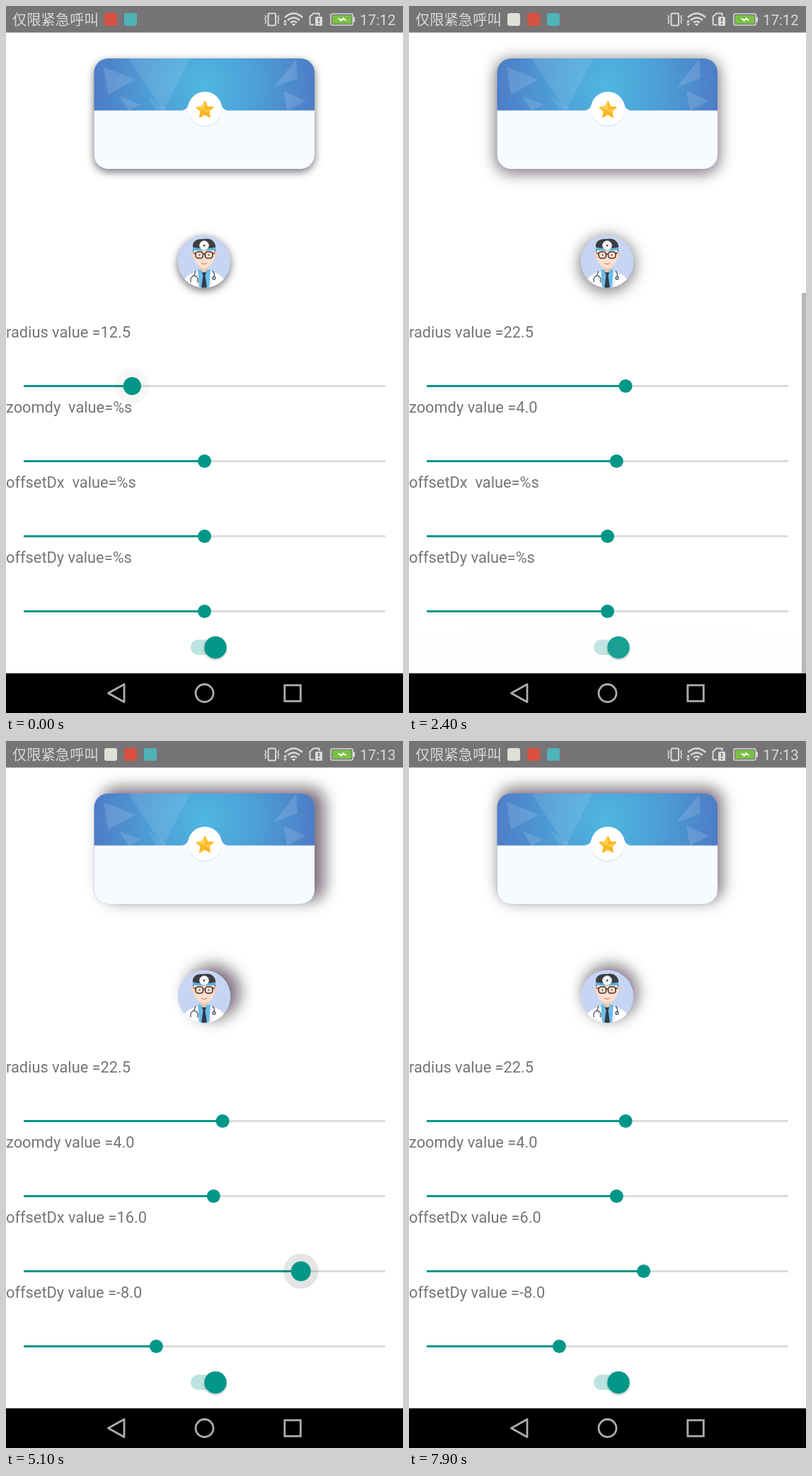
Recreate the animation shown at these times as an HTML page. Size 561 by 998 pixels, loop 8000 ms.

```html
<!DOCTYPE html>
<html lang="zh">
<head>
<meta charset="utf-8">
<title>Shadow settings</title>
<style>
  html, body { margin: 0; width: 100%; height: 100%; overflow: hidden; background: #fff; }
  svg { display: block; width: 561px; height: 998px; }
  text { font-family: Roboto, sans-serif; white-space: pre; }
  .label { font-size: 21.8px; fill: #757575; }
  .status { font-size: 20.4px; fill: #dad8da; }
  .cjk { font-family: "Noto Sans CJK SC", "Noto Sans CJK", sans-serif; font-size: 20.3px; }
</style>
</head>
<body>
<svg viewBox="0 0 561 998">
  <defs>
    <filter id="soft" filterUnits="userSpaceOnUse" x="0" y="0" width="561" height="500">
      <feGaussianBlur id="blur" stdDeviation="6"/>
    </filter>
    <filter id="drop" x="-30%" y="-30%" width="160%" height="160%">
      <feDropShadow dx="0" dy="1.5" stdDeviation="1.5" flood-opacity=".3"/>
    </filter>
    <radialGradient id="sky" gradientUnits="userSpaceOnUse" cx="280" cy="112" r="158">
      <stop offset="0" stop-color="#4fb7e1"/>
      <stop offset=".45" stop-color="#4da0d8"/>
      <stop offset="1" stop-color="#4d7dc6"/>
    </radialGradient>
    <linearGradient id="gold" x2="1" y2="1">
      <stop offset="0" stop-color="#ffd23c"/>
      <stop offset="1" stop-color="#f9a210"/>
    </linearGradient>
    <clipPath id="cardClip"><rect x="124.5" y="74" width="311.5" height="156" rx="20"/></clipPath>
    <clipPath id="faceClip"><circle cx="280" cy="360.5" r="37.3"/></clipPath>
  </defs>
  <rect width="561" height="998" fill="#fff"/>

  <g id="page">
    <g filter="url(#soft)" fill="#140a10" fill-opacity=".57">
      <rect id="cardShade"/>
      <circle id="faceShade"/>
    </g>

    <g clip-path="url(#cardClip)">
      <rect x="124" y="73" width="313" height="158" fill="url(#sky)"/>
      <g fill="#fff" fill-opacity=".13">
        <path d="M138 86l45 18-39 21zM160 127l30 12-17 9zM410 75l2 27-34 13zM392 120l32 14-27 14z"/>
        <path d="M173 74h87l-38 74z" fill-opacity=".1"/>
        <path d="M200 126l30 22h-18z" fill-opacity=".08"/>
      </g>
      <path d="M124 147.5H248Q255 147.5 258 139A24.5 24.5 0 0 1 304 139Q307 147.5 314 147.5H437V231H124z" fill="#f7faff"/>
      <circle cx="281" cy="146.5" r="24" fill="#d5e6f5"/>
      <circle cx="281" cy="145" r="24" fill="#fff"/>
      <path id="star" fill="url(#gold)" stroke="#fbb725" stroke-width="2" stroke-linejoin="round"/>
      <path d="M281 135v12l-11.5-3.5zM281 147l11.5-3.5-8 7z" fill="#ffe27a" opacity=".45"/>
    </g>

    <g clip-path="url(#faceClip)">
      <circle cx="280" cy="360.5" r="38" fill="#c6d5f3"/>
      <path d="M246 400q2-18 22-25l12-5 12 5q20 7 23 25z" fill="#fff"/>
      <path d="M271 372h18l-2 28h-14z" fill="#6cbde8"/>
      <path d="M274 362h12v9l-6 6-6-6z" fill="#f0c6ae"/>
      <path d="M277 376h6l-1.500 4 2.500 19h-8l2.500-19z" fill="#33394a"/>
      <path d="M271 372l-5 8 8 19M289 372l5 8-8 19" fill="none" stroke="#dcdfe6" stroke-width="1.300"/>
      <circle cx="264.5" cy="352" r="3" fill="#f5cdb6"/><circle cx="295.500" cy="352" r="3" fill="#f5cdb6"/>
      <path d="M265 340h30v14q-2 13-15 17-13-4-15-17z" fill="#fcdfcd"/>
      <path d="M264 348v-11q2-9 14-8 15-3 18 9v10l-2-5h-28z" fill="#3d3d40"/>
      <path d="M264 340.500q16 3 32 0v4q-16 2-32 0z" fill="#58b3de"/>
      <circle cx="280" cy="338" r="6.500" fill="#f7f7f8" stroke="#d5d8dc" stroke-width=".8"/>
      <circle cx="280" cy="338" r="1.500" fill="#555"/>
      <g fill="none" stroke="#4a302c" stroke-width="1.600">
        <rect x="268" y="347" width="10.500" height="9" rx="3.500"/>
        <rect x="281.500" y="347" width="10.500" height="9" rx="3.500"/>
        <path d="M278.500 350h3M265 349h3M292 349h3"/>
      </g>
      <circle cx="273.500" cy="351.500" r="1" fill="#333"/><circle cx="286.500" cy="351.500" r="1" fill="#333"/>
      <path d="M276 363q4 2.500 8 0" fill="none" stroke="#d98f7c" stroke-width="1.300"/>
      <g fill="none" stroke="#55585f" stroke-width="1.300">
        <path d="M268 374q-2 4-2 6M261 390v-5q5-9 10 0v5M292 374q4 5 2 8"/>
        <circle cx="294" cy="384" r="2" fill="#d8dade"/>
      </g>
    </g>

    <g id="sliders"></g>

    <rect x="261" y="894.500" width="45" height="21.500" rx="10.750" fill="#bce3df"/>
    <circle cx="296" cy="905.500" r="15.700" fill="#009688" filter="url(#drop)"/>
  </g>

  <path id="glow" d="M0 942V893Q280 846 561 893V942z" fill="#f4f4f4"/>
  <rect id="bar" x="555" width="6" height="537" fill="#b8b8b8"/>

  <rect width="561" height="37.500" fill="#767476"/>
  <text class="status cjk" x="9" y="27">仅限紧急呼叫</text>
  <rect id="extra" x="139" y="10" width="18" height="18" rx="3" fill="#dfe1d6"/>
  <g id="apps">
    <rect x="139" y="10" width="18" height="18" rx="3" fill="#d8503f"/>
    <rect x="167" y="10" width="18" height="18" rx="3" fill="#4fb3b8"/>
  </g>
  <g fill="none" stroke="#dad8da" stroke-width="2">
    <rect x="370.500" y="10.500" width="10.500" height="17" rx="1.500"/>
    <path d="M366 13l1.500 3-1.500 3 1.500 3-1.500 3M385.500 13l-1.500 3 1.500 3-1.500 3 1.500 3" stroke-width="1.600"/>
    <path d="M394 16q12.500-11 25 0M398 20q8.500-7 17 0M402 23.500q4.500-3.500 9 0" stroke-width="2.600"/>
    <path d="M429.500 26.500V15l5-4.500h8V14M429.500 26.500h6"/>
    <rect x="459" y="11" width="31" height="16" rx="2" stroke-width="1.600"/>
  </g>
  <g fill="#dad8da">
    <path d="M403.500 25h6l-3 3.500zM392 23l2.500-4 2.500 4zM392 24.500h5l-2.500 4z"/>
    <rect x="437" y="15" width="10" height="13" rx="1.500"/>
    <rect x="490.500" y="15.500" width="2.500" height="7"/>
  </g>
  <path d="M442 17v5M442 24v2" stroke="#767476" stroke-width="2"/>
  <rect x="461" y="13" width="27" height="12" fill="#79c143"/>
  <path d="M468 17l7 1.500 1-3 6 5.500-7-1.500-1 3z" fill="#fff"/>
  <text id="clock" class="status" x="500" y="26.500"></text>

  <rect y="942" width="561" height="56" fill="#000"/>
  <g fill="none" stroke="#adadad" stroke-width="2.800">
    <path d="M144.500 970L167 957.500v25z" stroke-linejoin="round"/>
    <circle cx="280.500" cy="970" r="12.500"/>
    <rect x="393.800" y="958.800" width="22.500" height="22.500"/>
  </g>
</svg>
<script>
const LOOP = 8000, LEFT = 25, WIDTH = 511;
const $ = id => document.getElementById(id);
const clamp = v => Math.max(0, Math.min(1, v));
const set = (el, attrs) => { for (const k in attrs) el.setAttribute(k, attrs[k]); };

// value at time t along [time, value] keys, eased between them
function track(keys, t) {
  let [t0, v0] = keys[0];
  for (const [t1, v1] of keys) {
    if (t < t1) {
      const u = clamp((t - t0) / (t1 - t0));
      return v0 + (v1 - v0) * u * u * (3 - 2 * u);
    }
    [t0, v0] = [t1, v1];
  }
  return v0;
}

// rises after `from`, falls after `to`
const pulse = (t, from, rise, to, fall) =>
  Math.min(clamp((t - from) / rise), 1 - clamp((t - to) / fall));

const sliders = [
  { name: 'radius', idle: '', min: .5, max: 40.5, step: .5, press: [-70, 780],
    keys: [[0, 12.5], [600, 22.5]] },
  { name: 'zoomdy', idle: '  value=%s', min: -80, max: 80, step: 1, press: [1075, 1960],
    keys: [[1140, 0], [1200, -10], [1400, -20], [1850, 4]] },
  { name: 'offsetDx', idle: '  value=%s', min: -30, max: 30, step: 1, press: [4600, 5950],
    keys: [[4650, 0], [5050, 16], [5150, 16], [5800, 6]] },
  { name: 'offsetDy', idle: ' value=%s', min: -30, max: 30, step: 1, press: [2900, 4400],
    keys: [[2950, 0], [3450, -16], [3750, -16], [4350, -8]] }
];

function add(tag, attrs) {
  const el = document.createElementNS('http://www.w3.org/2000/svg', tag);
  set(el, attrs);
  return $('sliders').appendChild(el);
}

sliders.forEach((s, i) => {
  const y = 536.5 + 106 * i;
  s.label = add('text', { class: 'label', x: 0, y: y - 68.5 });
  add('rect', { x: LEFT, y: y - 1.5, width: WIDTH, height: 3, fill: '#dcdcdc' });
  s.fill = add('rect', { x: LEFT, y: y - 1.5, height: 3, fill: '#009688' });
  s.halo = add('circle', { cy: y, r: 24.8, fill: '#140a10' });
  s.thumb = add('circle', { cy: y, fill: '#009688' });
});

const corners = Array.from({ length: 10 }, (_, i) => {
  const r = i % 2 ? 5.6 : 12, a = Math.PI * (i / 5 - .5);
  return `${281 + r * Math.cos(a)} ${147 + r * Math.sin(a)}`;
});
$('star').setAttribute('d', `M${corners.join('L')}z`);

function drawSlider(s, t) {
  const raw = track(s.keys, t);
  s.value = Math.round(raw / s.step) * s.step;
  const x = LEFT + WIDTH * (s.value - s.min) / (s.max - s.min);
  const [from, to] = s.press;
  s.label.textContent = s.name +
    (t < s.keys[0][0] ? s.idle : ` value =${s.value.toFixed(1)}`);
  set(s.fill, { width: x - LEFT });
  set(s.halo, { cx: x, opacity: .105 * pulse(t, from, 250, to, 150) });
  set(s.thumb, { cx: x, r: 9.5 + 4.5 * pulse(t, from, 100, to, 100) });
}

function drawShadows(t) {
  const [radius, zoom, dx, dy] = sliders.map(s => s.value);
  const px = .78, grow = zoom * .4;
  const ox = dx * px, oy = (t < sliders[3].keys[0][0] ? 5 : dy) * px;
  set($('blur'), { stdDeviation: .577 * radius * px + .4 });
  set($('cardShade'), {
    x: 124.5 + ox - grow, y: 74 + oy - grow,
    width: 311.5 + 2 * grow, height: 156 + 2 * grow, rx: 20
  });
  set($('faceShade'), { cx: 280 + ox, cy: 360.5 + oy, r: 37.3 + zoom * .25 });
}

function draw(t) {
  sliders.forEach(s => drawSlider(s, t));
  drawShadows(t);

  const scroll = track([[6200, 0], [6350, 3], [6500, 3], [6750, 0]], t);
  set($('page'), { transform: `translate(0 ${scroll})` });
  set($('bar'), {
    y: 405 - scroll * .6,
    opacity: Math.max(pulse(t, 2050, 50, 2550, 250), pulse(t, 6200, 50, 7250, 250))
  });
  set($('glow'), { opacity: .1 * pulse(t, 2100, 200, 2450, 300) });

  const notified = t >= 1600;
  set($('extra'), { opacity: +notified });
  set($('apps'), { transform: `translate(${notified ? 28 : 0} 0)` });
  $('clock').textContent = t < 3000 ? '17:12' : '17:13';
}

const start = performance.now();
function frame() {
  draw((performance.now() - start) % LOOP);
  requestAnimationFrame(frame);
}
frame();
</script>
</body>
</html>
```
